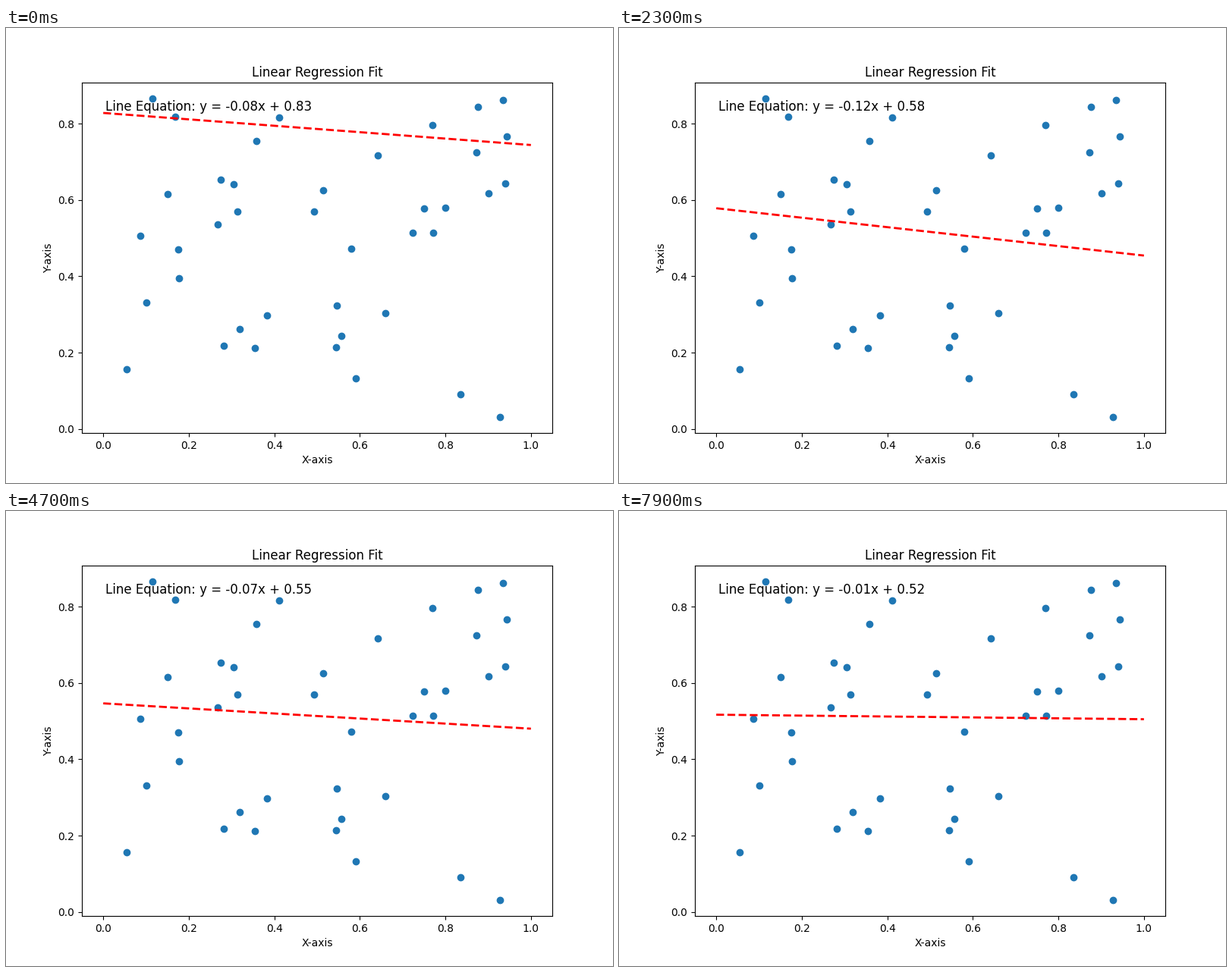
A matplotlib script for the animation above (8000 ms loop, 800 by 600 pixels).

```python
import numpy as np
import matplotlib.pyplot as plt
from matplotlib.animation import FuncAnimation

FRAMES = 80
INTERVAL = 100
RATE = 0.1
START = (-0.084, 0.828)  # slope, intercept

# Sample positions on the 800 x 600 stage
SPOTS = np.array([
    (193, 93), (223, 117), (360, 118), (330, 149), (562, 128),
    (622, 104), (655, 95), (660, 143), (620, 164), (490, 168),
    (283, 200), (300, 206), (213, 219), (305, 242), (279, 259),
    (177, 274), (227, 292), (228, 330), (185, 362), (344, 379),
    (308, 397), (287, 419), (328, 422), (159, 450), (418, 214),
    (406, 242), (455, 291), (436, 366), (442, 406), (435, 421),
    (461, 462), (500, 376), (551, 238), (579, 237), (536, 270),
    (563, 270), (636, 218), (658, 205), (599, 483), (651, 513),
])


def to_x(px):
    return (px - 100) / 620 * 1.1 - 0.05


def to_y(py):
    return (528.7 - py) / 503.25


x, y = to_x(SPOTS[:, 0]), to_y(SPOTS[:, 1])


def descend(steps):
    """Gradient descent on the mean squared error."""
    slope, intercept = START
    for _ in range(steps):
        error = slope * x + intercept - y
        slope -= RATE * 2 * np.mean(error * x)
        intercept -= RATE * 2 * np.mean(error)
    return slope, intercept


plt.rcParams["font.family"] = "DejaVu Sans"
fig, ax = plt.subplots(figsize=(8, 6), dpi=100)
fig.subplots_adjust(left=0.125, right=0.9, bottom=0.11, top=0.88)
ax.scatter(x, y)
line, = ax.plot([], [], color="red", linestyle="--", linewidth=2)
label = ax.text(0.05, 0.95, "", transform=ax.transAxes, fontsize=12, va="top")
ax.set_xlim(to_x(100), to_x(720))
ax.set_ylim(to_y(534), to_y(72))
ax.set_title("Linear Regression Fit")
ax.set_xlabel("X-axis")
ax.set_ylabel("Y-axis")


def update(step):
    slope, intercept = descend(step)
    line.set_data([0, 1], [intercept, slope + intercept])
    label.set_text(f"Line Equation: y = {slope:.2f}x + {intercept:.2f}")
    return line, label


anim = FuncAnimation(fig, update, frames=FRAMES, interval=INTERVAL,
                     repeat=True, repeat_delay=0)
plt.show()
```
